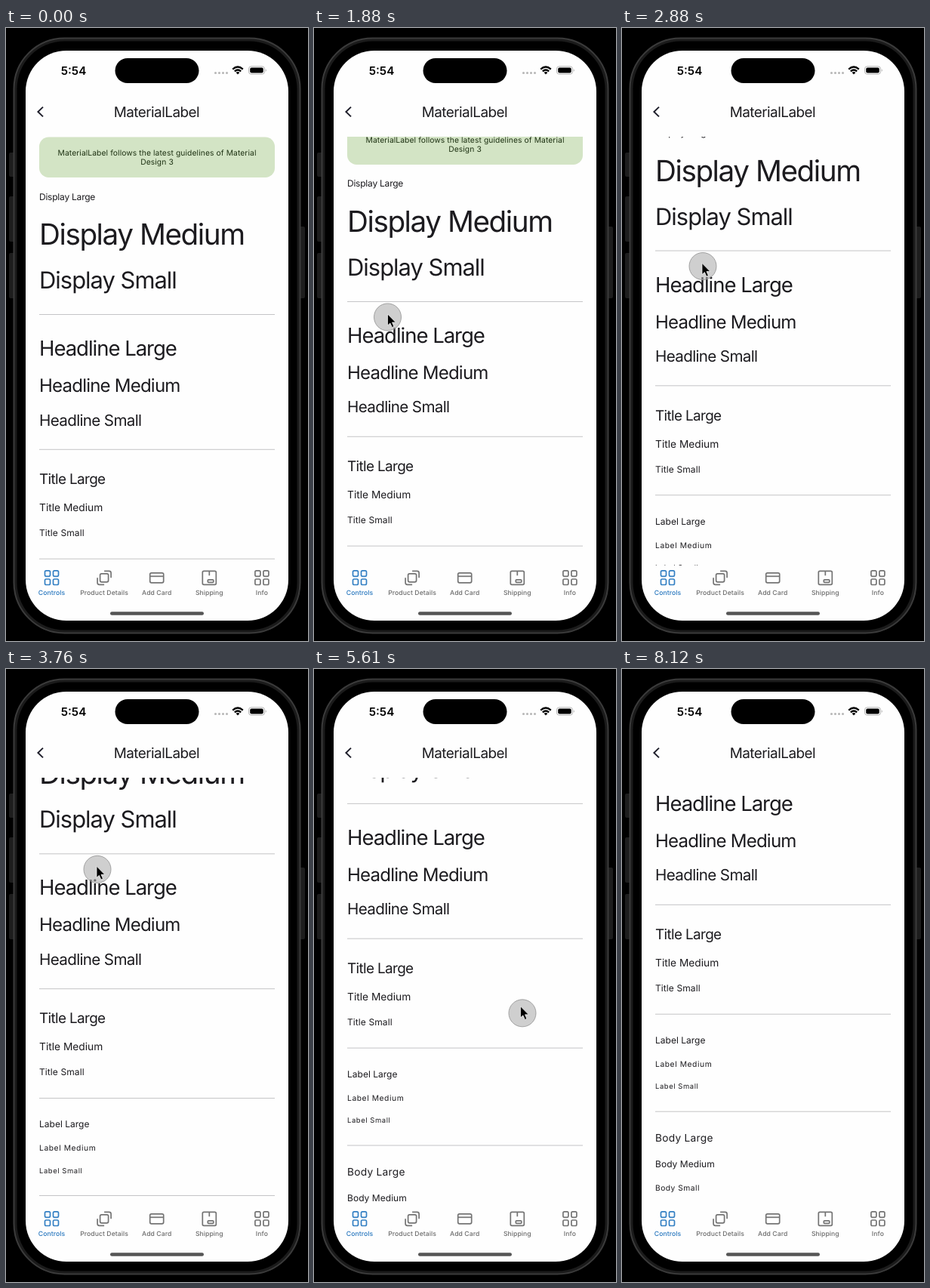
Recreate the animation shown at these times as an HTML page. Size 400 px wide and 812 px high, loop 8150 ms.

```html
<!DOCTYPE html>
<html lang="en">
<head>
<meta charset="utf-8">
<title>MaterialLabel</title>
<style>
  html, body { margin: 0; width: 100%; height: 100%; overflow: hidden; background: #000; }
  svg { display: block; width: 400px; height: 812px; }
  text { font-family: Inter, "Liberation Sans", sans-serif; font-optical-sizing: none; text-rendering: geometricPrecision; fill: #1c1b1f; }
  .mid { text-anchor: middle; }
  .banner { font-size: 10.3px; letter-spacing: .09px; fill: #1f3314; }
  .tab { fill: none; stroke: #747474; stroke-width: 1.7; stroke-linejoin: round; }
  .tab text { fill: #6c6c6c; stroke: none; font-size: 8.6px; font-weight: 500; letter-spacing: .08px; }
  .tab.on { stroke: #3480c4; }
  .tab.on text { fill: #2676be; }
</style>
</head>
<body>
<svg viewBox="0 0 400 812">
  <defs>
    <clipPath id="view"><rect x="26" y="144" width="348" height="568"/></clipPath>
    <g id="grid">
      <rect x="-9" y="-9.5" width="7" height="7.5" rx="1.7"/><rect x="2" y="-9.5" width="7" height="7.5" rx="1.7"/>
      <rect x="-9" y="1.7" width="7" height="7.5" rx="1.7"/><rect x="2" y="1.7" width="7" height="7.5" rx="1.7"/>
    </g>
    <g id="copies">
      <rect x="-5.5" y="-5.5" width="11" height="11" rx="2"/>
      <path d="M0-9H6.5Q9-9 9-6.5V0M0 9H-6.5Q-9 9-9 6.5V0"/>
    </g>
    <g id="card"><rect x="-9" y="-6.5" width="18" height="13" rx="2"/><path d="M-9-2H9"/></g>
    <g id="box">
      <rect x="-9" y="-9" width="18" height="18" rx="1.8"/>
      <path d="M0-9V-3"/><rect x="-2" y="2.6" width="7.5" height="3.4" rx="1"/>
    </g>
  </defs>

  <!-- phone body -->
  <g fill="#1d1d1d">
    <rect x="4" y="165" width="8" height="32" rx="2"/><rect x="4" y="223" width="8" height="60" rx="2"/>
    <rect x="4" y="298" width="8" height="60" rx="2"/><rect x="388" y="263" width="8" height="95" rx="2"/>
  </g>
  <rect x="10.5" y="13.5" width="379" height="788" rx="67" fill="#1b1b1b" stroke="#3b3b3b" stroke-width="2"/>
  <rect x="14.5" y="17.5" width="371" height="780" rx="63" fill="#000"/>
  <rect x="26" y="30" width="348" height="755" rx="54" fill="#fefefe"/>

  <!-- status bar -->
  <rect x="144.5" y="40" width="111" height="33" rx="16.5"/>
  <text x="89.5" y="61.5" class="mid" font-size="15.2" font-weight="600" style="fill:#000">5:54</text>
  <path d="M277.5 59.5H293" stroke="#b9b9b9" stroke-width="3.2" stroke-linecap="round" stroke-dasharray="0 5"/>
  <g fill="none" stroke="#000" stroke-width="2.2">
    <path d="M300.2 54.6Q307 48.4 313.8 54.6M302.8 57.4Q307 53.6 311.2 57.4"/>
    <path d="M307 61.5L304.6 59Q307 56.9 309.4 59Z" fill="#000" stroke="none"/>
    <rect x="321.5" y="50.9" width="21" height="10.2" rx="3.2" stroke="#b4b4b4" stroke-width="1"/>
  </g>
  <rect x="323.2" y="52.6" width="17.6" height="6.8" rx="1.9"/>
  <path d="M343.8 54.2Q346 56 343.8 57.8Z" fill="#b4b4b4"/>

  <!-- title bar -->
  <path d="M49 104.6L42.4 111L49 117.4" fill="none" stroke="#20202c" stroke-width="2"/>
  <text x="199.4" y="118" class="mid" font-size="18.9" letter-spacing="-.52">MaterialLabel</text>

  <g clip-path="url(#view)">
    <g id="list">
      <rect x="44" y="144.5" width="312" height="53.5" rx="12.5" fill="#d3e4c5"/>
      <text x="200" y="169" class="mid banner">MaterialLabel follows the latest guidelines of Material</text>
      <text x="200" y="181.3" class="mid banner">Design 3</text>
      <path d="M44 379.5H356M44 558.3H356M44 703.2H356M44 832.2H356" stroke="#c4c4c6"/>
    </g>
  </g>

  <g id="tabs"></g>
  <rect x="138" y="773.3" width="124" height="4.4" rx="2.2" fill="#555"/>

  <g id="touch">
    <circle r="18" fill="#aaa" fill-opacity=".55" stroke="#999" stroke-width=".9"/>
    <path id="arrow" d="M0 0V15L3.4 12L5.9 17.6L8.4 16.5L6 11H10.8Z" fill="#000" stroke="#fff" stroke-width=".7"/>
  </g>
</svg>
<script>
const LOOP = 8150, MAX_SCROLL = 246, VIEW_HEIGHT = 570;
const byId = id => document.getElementById(id);

function add(parent, tag, attrs, text = '') {
  const el = document.createElementNS('http://www.w3.org/2000/svg', tag);
  for (const key in attrs) el.setAttribute(key, attrs[key]);
  el.textContent = text;
  parent.append(el);
  return el;
}

// label, baseline, size, letter spacing
[
  ['Display Large', 227.5, 12.03, -.23],
  ['Display Medium', 287, 38.65, -1.42],
  ['Display Small', 345, 30.9, -.98],
  ['Headline Large', 434, 27.5, -1.02],
  ['Headline Medium', 482, 24.05, -.8],
  ['Headline Small', 526.5, 20.6, -.64],
  ['Title Large', 604, 18.9, -.64],
  ['Title Medium', 640, 13.75, 0],
  ['Title Small', 673, 12.03, .09],
  ['Label Large', 742, 12.03, 0],
  ['Label Medium', 773, 10.3, .56],
  ['Label Small', 802.5, 9.45, .58],
  ['Body Large', 872.5, 13.75, .25],
  ['Body Medium', 906, 12.03, .04],
  ['Body Small', 937, 10.3, .45]
].forEach(([label, y, size, gap]) =>
  add(byId('list'), 'text', { x: 44, y, 'font-size': size, 'letter-spacing': gap }, label));

[['Controls', 'grid'], ['Product Details', 'copies'], ['Add Card', 'card'], ['Shipping', 'box'], ['Info', 'grid']]
  .forEach(([label, icon], i) => {
    const tab = add(byId('tabs'), 'g', {
      class: i ? 'tab' : 'tab on',
      transform: `translate(${60.5 + i * 69.6} 728.3)`
    });
    add(tab, 'use', { href: '#' + icon });
    add(tab, 'text', { y: 22.8, class: 'mid' }, label);
  });

// Each drag: time, x, y, arrow offset x, arrow offset y
const drags = [
  [[1500, 97, 400, 0, -4], [1880, 97.5, 383, 0, -4], [2880, 107, 315.6, -1, -4],
   [3760, 121, 265.4, -1, -4], [4100, 123, 260, -1, -4]],
  [[5000, 283, 517, -2, -4], [5610, 276, 456, -2.5, -9], [6270, 260, 336.5, -2, -1.5],
   [6600, 257, 322, -2, -2]]
];

// Smooth curve through the keys, at rest at both ends
function pose(keys, t) {
  const last = keys.length - 1;
  let i = 0;
  while (i < last - 1 && t > keys[i + 1][0]) i++;
  const a = keys[i], b = keys[i + 1], span = b[0] - a[0], u = (t - a[0]) / span;
  const slope = (k, c) => k > 0 && k < last
    ? (keys[k + 1][c] - keys[k - 1][c]) / (keys[k + 1][0] - keys[k - 1][0]) * span : 0;
  return [1, 2, 3, 4].map(c =>
    a[c] + (b[c] - a[c]) * u * u * (3 - 2 * u)
    + slope(i, c) * u * (1 - u) ** 2 - slope(i + 1, c) * u * u * (1 - u));
}

function rubber(offset) {
  const over = offset - MAX_SCROLL;
  return over > 0 ? MAX_SCROLL + VIEW_HEIGHT * (1 - 1 / (over * .55 / VIEW_HEIGHT + 1)) : offset;
}

const firstY = drags[0][0][2], restOffset = firstY - drags[0][4][2];
const secondY = drags[1][0][2], endOffset = rubber(restOffset + secondY - drags[1][3][2]);

function scrollAt(t) {
  if (t < 1500) return 0;
  if (t < 4100) return firstY - pose(drags[0], t)[1];
  if (t < 5000) return restOffset;
  if (t < 6600) return rubber(restOffset + secondY - pose(drags[1], t)[1]);
  const s = (t - 6600) * .01;
  return MAX_SCROLL + (endOffset - MAX_SCROLL) * (1 + s) * Math.exp(-s);
}

const start = performance.now();
function draw() {
  const t = (performance.now() - start) % LOOP;
  byId('list').setAttribute('transform', `translate(0 ${-scrollAt(t)})`);
  const keys = drags.find(d => t >= d[0][0] && t < d[d.length - 1][0]);
  byId('touch').style.display = keys ? '' : 'none';
  if (keys) {
    const [x, y, dx, dy] = pose(keys, t);
    byId('touch').setAttribute('transform', `translate(${x} ${y})`);
    byId('arrow').setAttribute('transform', `translate(${dx} ${dy})`);
  }
  requestAnimationFrame(draw);
}
draw();
</script>
</body>
</html>
```
